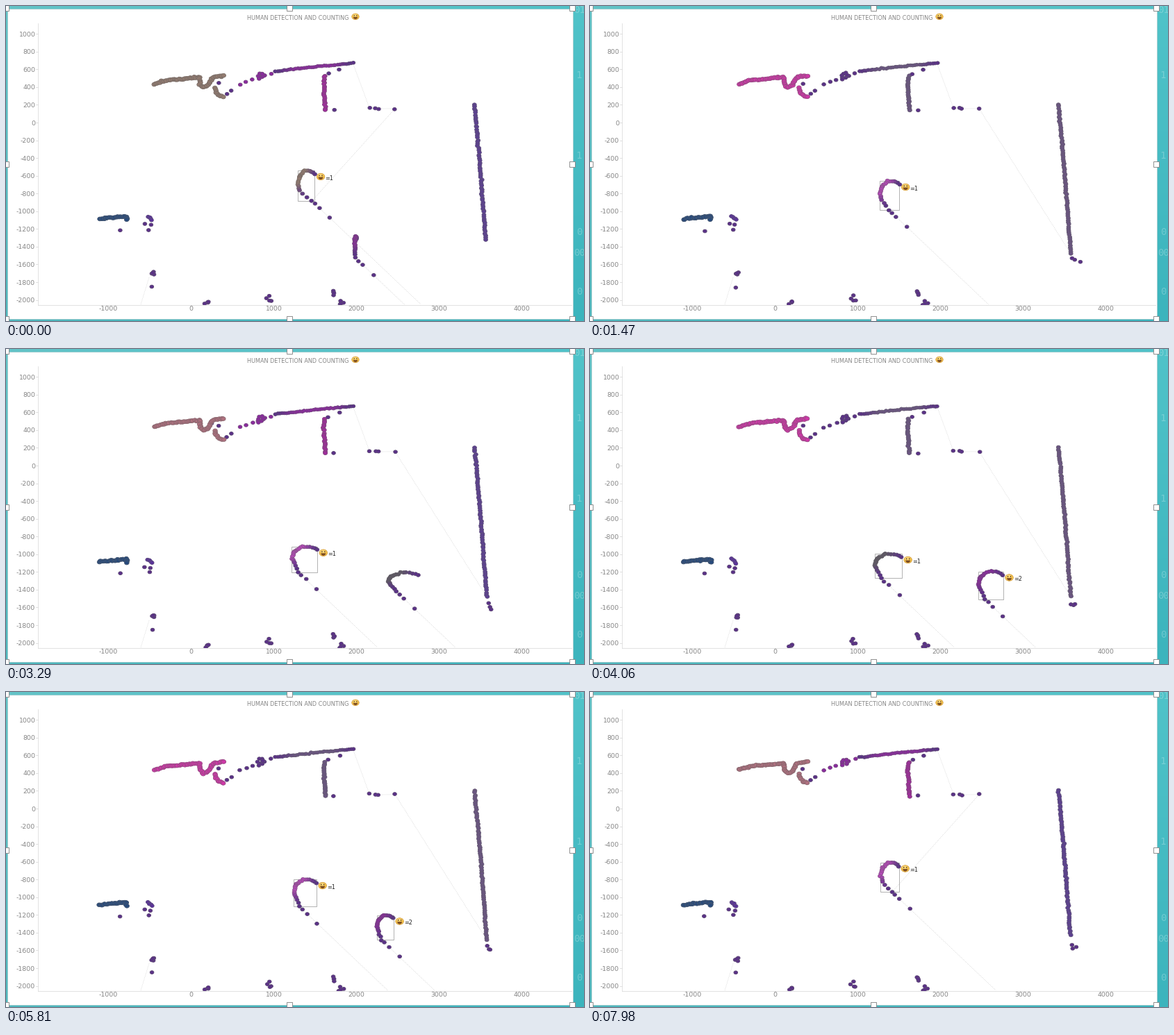
Animation, 832 px wide and 454 px high, one loop 8000 ms. Source, as a matplotlib script:

```python
import numpy as np
import matplotlib.pyplot as plt
from matplotlib.animation import FuncAnimation
from matplotlib.collections import LineCollection
from matplotlib.colors import to_rgb
from matplotlib.patches import Ellipse, Polygon, Rectangle, Wedge
from matplotlib.path import Path
from matplotlib.transforms import Affine2D

W, H = 832, 454
PX = 0.72  # points per pixel at 100 dpi
INTERVAL, FRAMES, SCAN = 40, 200, 70
FLOOR = 430

PINK, ROSE, BROWN = "#cf37a8", "#b0707f", "#937b70"
VIOLET, DARK, GRAY = "#8a2a9e", "#5a3088", "#6a5482"
INDIGO, SLATE, MAGENTA, NAVY = "#5c3f92", "#5f5866", "#b648b8", "#274a7c"

# The colour scheme flips between vivid and muted at these times.
FLIPS = [735, 1995, 3290, 5845]
HALL_TINTS = [BROWN, PINK, ROSE, PINK, ROSE]

# Fixed surroundings
HALL = [(214, 112), (232, 107), (279, 102.5), (280, 113), (284, 117.5),
        (291, 114), (298, 102.5), (313, 100.5)]
HOOK = [(301, 118), (302, 124), (307, 129), (313, 131)]
WALL = [(388, 94), (440, 88), (500, 82.3)]
COLUMN = [(459, 101), (457.5, 110), (458, 125), (460, 150)]
BENCH = [(135, 307), (150, 305), (174, 303), (173.5, 308)]
POST = [(204, 303), (207, 305), (210, 308.5)]
ROW = [(523, 146.8), (531.7, 147.3), (536, 148), (560, 147.8)]
LOOSE = [(295.5, 107), (306, 111), (318, 127), (324, 122.5), (464, 98), (480, 91.5),
         (472, 149.6), (164.5, 324), (200, 314), (208, 315), (206, 322), (210, 405)]
CLUMPS = [(209, 387), (287, 427), (378, 421), (472, 413), (482, 427)]

# First person: top edge over time. Second person: x, y, width, height.
ONE_T = [0, 1470, 2520, 4060, 4970, 6720, 7980]
ONE_TOP = [237, 252, 274.5, 295, 302, 235.5, 245.5]
TWO_T = [0, 2520, 4060, 4970, 6720]
TWO_BOX = np.array([(502, 332, 3, 31), (541, 324, 51, 14), (558.5, 320.5, 36, 40.5),
                    (566, 315.5, 42, 38.5), (499, 328, 4, 33)])


def along(pts, gap):
    """Evenly spaced points on a polyline."""
    pts = np.asarray(pts, float)
    run = np.r_[0, np.cumsum(np.hypot(*np.diff(pts, axis=0).T))]
    s = np.linspace(0, run[-1], int(run[-1] / gap) + 1)
    return np.c_[np.interp(s, run, pts[:, 0]), np.interp(s, run, pts[:, 1])]


def body(box, lean, n=25):
    """Hook-shaped outline inside a box, densest on its left side."""
    x, y, w, h = box
    knots = np.array([(1, 0.12), (0.75, 0.02), (0.42, 0), (0.1, 0.2),
                      (0, 0.47), (0.12, 0.68), (lean, 1)])
    v = np.linspace(-1, 1, n)
    u = 3 + 3 * np.sign(v) * np.abs(v) ** 1.6
    k = np.arange(len(knots))
    return np.c_[x + w * np.interp(u, k, knots[:, 0]), y + h * np.interp(u, k, knots[:, 1])]


def to_floor(a, b):
    """Where the line from a through b meets the floor."""
    return b + (b - a) * (FLOOR - b[1]) / (b[1] - a[1])


fig = plt.figure(figsize=(W / 100, H / 100), dpi=100)
ax = fig.add_axes([0, 0, 1, 1])
ax.axis("off")

teal = np.array([[to_rgb("#62c4c8"), to_rgb("#50c3c9")],
                 [to_rgb("#50b8be"), to_rgb("#3cb4bd")]])
ax.imshow(teal, extent=(-W / 2, W * 1.5, H * 1.5, -H / 2), aspect="auto",
          interpolation="bilinear", zorder=0)
ax.set_xlim(0, W)
ax.set_ylim(H, 0)


def label(x, y, s, size, color, **kw):
    kw = {"ha": "center", "va": "center_baseline", "family": "DejaVu Sans", **kw}
    return ax.text(x, y, s, fontsize=size * PX, color=color, **kw)


def stroke(xs, ys):
    ax.plot(xs, ys, color="#dadada", lw=0.8 * PX, zorder=5)


for y, s in [(5, "01"), (98, "1"), (215, "1"), (325, "0"), (355, "00"), (411, "0")]:
    label(825, y, s, 14, "white", alpha=0.25, family="DejaVu Sans Mono", zorder=0.5)

ax.add_patch(Rectangle((1.5, 3.5), 814, 447, fc="white", ec="#a3cfd1", lw=PX, zorder=1))
ax.add_patch(Rectangle((4, 431), 809, 18, fc="white", lw=0, zorder=4))
for x in (0, 407.5, 815):
    for y in (3, 227.5, 451):
        if (x, y) != (407.5, 227.5):
            ax.add_patch(Rectangle((x - 4, y - 4), 8, 8, fc="white", ec="#858585",
                                   lw=0.9 * PX, zorder=6))

stroke([45.5, 45.5], [25, 430.5])
stroke([45.5, 814], [430.5, 430.5])
for v in range(-2000, 1001, 200):
    y = 168 - 0.1278 * v
    stroke([43, 45.5], [y, y])
    label(42, y, str(v), 9.4, "#878787", ha="right", zorder=6)
for v in range(-1000, 4001, 1000):
    x = 266 + 0.1191 * v
    stroke([x, x], [430.5, 433])
    label(x, 435.5, str(v), 9.4, "#878787", zorder=6)
label(347, 16, "HUMAN DETECTION AND COUNTING", 8.17, "#858585", ha="left", zorder=6)


class Face:
    """Smiling face with an optional count beside it."""

    def __init__(self, text="", scale=1.0):
        self.move = Affine2D()
        self.scale = scale
        self.parts = [
            Ellipse((0, 0), 11.6, 9.6, fc="#f3c24c", ec="#d39a3a", lw=0.7 * PX),
            Ellipse((-0.6, -1.8), 7.5, 4.5, fc="#f8d678", lw=0),
            Ellipse((-2, -1.6), 1.5, 1.9, fc="#5a3b1c", lw=0),
            Ellipse((2, -1.6), 1.5, 1.9, fc="#5a3b1c", lw=0),
            Wedge((0, 0.6), 3.4, 0, 180, fc="#7a4a22", lw=0),
        ]
        for p in self.parts:
            ax.add_patch(p)
        if text:
            self.parts.append(label(6.2, 1.2, text, 8.1, "#222222", ha="left"))
        for p in self.parts:
            p.set_transform(self.move + ax.transData)
            p.set_zorder(2.5)

    def place(self, x, y, shown=True):
        self.move.clear().scale(self.scale).translate(x, y)
        for p in self.parts:
            p.set_visible(shown)


Face(scale=0.9).place(503, 15.3)
faces = [Face("=1"), Face("=2")]
frames = [ax.add_patch(Rectangle((0, 0), 1, 1, fc="none", ec="#a0a0a0", lw=0.8 * PX, zorder=2.2))
          for _ in faces]

arrow = np.array([(0, 0), (0, 8.5), (2, 6.8), (3.4, 10), (4.8, 9.4), (3.4, 6.3), (6, 6.2)])
cursor = ax.add_patch(Polygon(arrow + (433, 17), fc="black", ec="white", lw=0.5 * PX, zorder=8))

rays = LineCollection([], colors="#c4c4c4", linewidths=0.7 * PX,
                      linestyles=[(0, (1, 2))], zorder=2)
ax.add_collection(rays)
oval = Path.unit_circle().transformed(Affine2D().scale(1, 0.84))
dots = ax.scatter([], [], marker=oval, linewidths=0.9 * PX, zorder=3)

# Blobs of echoes that keep their shape from sweep to sweep
still = np.random.default_rng(4)
blobs = np.concatenate([c + still.uniform(-4, 4, (4, 2)) for c in CLUMPS])
knot = np.concatenate([along([(337, 113), (381, 97)], 8),
                       (366, 101) + still.uniform(-5, 5, (8, 2))])


class Sweep:
    """One turn of the scanner: its echoes and the beams between them."""

    def __init__(self, seed):
        self.rng = np.random.default_rng(seed)
        self.pos, self.fill, self.size, self.beams = [], [], [], []

    def add(self, pts, color, size=5.6, noise=0.4, tails=False):
        n = len(pts)
        self.pos.append(pts + self.rng.normal(0, noise, (n, 2)))
        # Thin ends of an outline fade to the colour of single echoes.
        u = np.sin(np.linspace(0, np.pi, n))[:, None] if tails else np.ones((n, 1))
        u = np.clip(1.8 * u - 0.3, 0, 1)
        self.fill.append(u * to_rgb(color) + (1 - u) * to_rgb(DARK))
        self.size.append(np.full(n, (size * PX) ** 2))

    def person(self, i, box, lean, tint, boxed):
        """Outline, trailing echoes, beam to the floor and marker; gives the lower end."""
        outline = body(box, lean)
        end = outline[-1]
        trail = end + np.outer(4.5 * 2.4 ** np.arange(3), (1, 0.95))
        self.add(outline, tint, 5.8, tails=True)
        self.add(trail, DARK)
        self.beams.append([end, to_floor(end, trail[-1])])
        x, y, w, h = box
        frames[i].set_bounds(x, y, w, h)
        frames[i].set_visible(boxed)
        faces[i].place(x + w + 9, y + 9, boxed)
        return end

    def show(self):
        fill = np.concatenate(self.fill)
        dots.set_offsets(np.concatenate(self.pos))
        dots.set_facecolors(fill)
        dots.set_edgecolors(0.55 * fill + 0.17)
        dots.set_sizes(np.concatenate(self.size))
        rays.set_segments(self.beams)


def update(frame):
    step = round(frame * INTERVAL / SCAN)
    t = step * SCAN
    phase = int(np.searchsorted(FLIPS, t))
    vivid = phase % 2 == 0
    sweep = Sweep(step)

    top = np.interp(t, ONE_T, ONE_TOP)
    down = top - 237
    foot = min(337 + 1.6 * down, 357)

    sweep.add(along(BENCH, 2), NAVY, 6.6, 0.6)
    sweep.add(along(POST, 2), "#5b329c")
    sweep.add(knot, VIOLET if vivid else DARK, noise=0.6)
    sweep.add(along(WALL, 3.2), VIOLET if vivid else GRAY, 5.4, 0.35, tails=True)
    sweep.add(along(COLUMN, 2.4), "#a02c9c" if vivid else GRAY, 6, 0.5)
    side = [(674.5, 142), (678, 180), (684, 250), (684 + 0.075 * (foot - 250), foot)]
    sweep.add(along(side, 3), INDIGO if vivid else GRAY, 5.8, 0.45)
    sweep.add(np.concatenate([LOOSE, ROW, blobs]), DARK, noise=0.5)
    sweep.add(along(HALL, 2), HALL_TINTS[phase], 6.6, 0.5)
    sweep.add(along(HOOK, 2), HALL_TINTS[phase], 6.4)
    if foot > 350:
        sweep.add(np.full((3, 2), (697, 368)), DARK, noise=3)

    # The first person narrows and stands straighter further down.
    left = 420 - 0.18 * down
    box = (left, top, 444 + 0.08 * down - left, 44 - 0.15 * down)
    lean = 0.25 + 0.65 * np.clip((260 - top) / 25, 0, 1)
    tint = BROWN if top < 240 else MAGENTA if top < 285 else SLATE
    low = sweep.person(0, box, lean, tint, True)

    # The second is hidden while behind the first, and leaves near the end.
    if phase != 1 and t < 7350:
        pos = [np.interp(t, TWO_T, column) for column in TWO_BOX.T]
        sweep.person(1, pos, 0.28, SLATE if phase == 2 else VIOLET, phase == 3)
    else:
        faces[1].place(0, 0, False)
        frames[1].set_visible(False)

    sweep.beams.append([(500, 84), *ROW, low if top < 248 else side[-1]])
    sweep.beams.append([(206, 391), (194, FLOOR)])
    sweep.show()
    cursor.set_visible(6300 <= t < 7200)
    return dots, rays


anim = FuncAnimation(fig, update, frames=FRAMES, interval=INTERVAL, repeat=True,
                     repeat_delay=0, init_func=lambda: update(0), blit=False)
plt.show()
```
